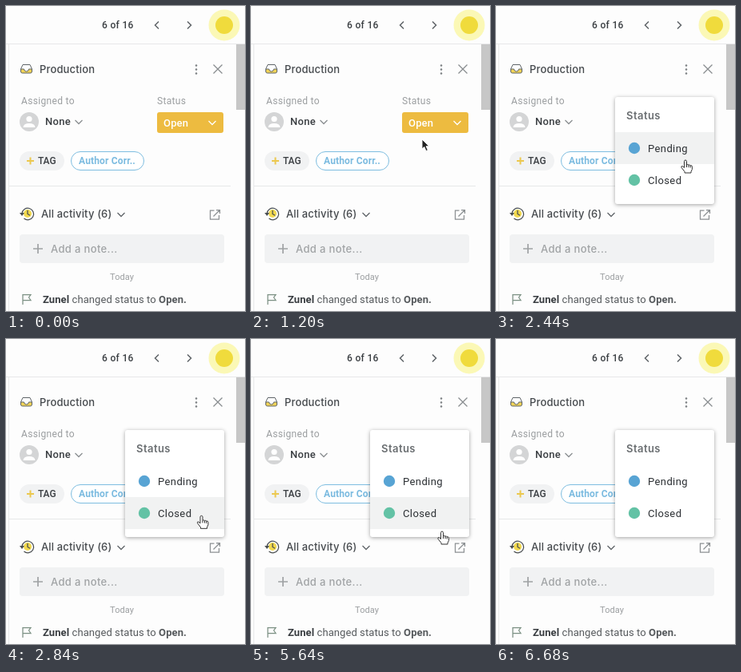
Write an HTML page that moves like this. It is 299x382 px and loops after 6720 ms.

```html
<!DOCTYPE html>
<html lang="en">
<head>
<meta charset="utf-8">
<title>Status menu</title>
<style>
html, body { margin: 0; width: 100%; height: 100%; overflow: hidden; background: #fdfdfd; }
svg { display: block; width: 100vw; height: 100vh; }
text { font: 500 13px Roboto, sans-serif; fill: #3a3e42; }
.wide { font-family: Inter, sans-serif; letter-spacing: .15px; fill: #45494d; }
.label { font-weight: 400; font-size: 12px; letter-spacing: .33px; fill: #9b9ea0; }
.line { fill: none; stroke: #5f6468; stroke-width: 1.25; }
.rule { stroke: #e7e8e9; }
#menu .card { filter: drop-shadow(0 1.5px 2.5px rgba(0, 0, 0, .36)); }
#menu .item { font-weight: 400; letter-spacing: .4px; fill: #2c3034; }
</style>
</head>
<body>
<svg viewBox="0 0 299 382">
  <defs><clipPath id="pane"><rect width="286" height="382"/></clipPath></defs>
  <rect width="299" height="382" fill="#fdfdfd"/>

  <!-- top bar -->
  <path class="rule" d="M0 47.5H299M3.5 47V382M4 225.5H281"/>
  <text x="120" y="28" style="font-size:12px;letter-spacing:.3px">6 of 16</text>
  <path class="line" style="stroke-width:1.5" d="M191 19.5L186.5 24L191 28.5M227 19.5L231.5 24L227 28.5"/>
  <circle cx="273" cy="24" r="19.5" fill="#fbf8b6"/>
  <circle cx="273" cy="24" r="11" fill="#f0db3c"/>
  <rect x="288" y="48" width="11" height="82" fill="#c7c7c7"/>

  <!-- heading -->
  <path d="M18.5 79H22.5Q23 82 25.5 82T28.5 79H32.5V82Q32.5 84 30.5 84H20.5Q18.5 84 18.5 82Z" fill="#f0d358"/>
  <path class="line" style="stroke-width:1" d="M18.5 79L21 73.5H30L32.5 79V82Q32.5 84 30.5 84H20.5Q18.5 84 18.5 82ZH22.5Q23 82 25.5 82T28.5 79H32.5"/>
  <text class="wide" x="42" y="84">Production</text>
  <g fill="#7b7f82"><circle cx="238" cy="74.5" r="1.25"/><circle cx="238" cy="79.5" r="1.25"/><circle cx="238" cy="84.5" r="1.25"/></g>
  <path class="line" style="stroke:#888c8f" d="M259.5 73.5L270.5 84.5M270.5 73.5L259.5 84.5"/>

  <!-- assignee and status -->
  <text class="label" x="19" y="123">Assigned to</text>
  <text class="label" x="189" y="123">Status</text>
  <circle cx="29" cy="145" r="12" fill="#d4d5d6"/>
  <circle cx="29" cy="141.5" r="3.6" fill="#fff"/>
  <path d="M21.5 152Q22 147 29 147T36.5 152Z" fill="#fff"/>
  <text x="49" y="149" style="letter-spacing:.3px">None</text>
  <path class="line" style="stroke:#8a8e91" d="M86.5 143L91 147.5L95.5 143"/>
  <rect x="189" y="133" width="83" height="26" rx="3" fill="#edbb40"/>
  <text x="197" y="151" style="fill:#fff;letter-spacing:.15px">Open</text>
  <path class="line" style="stroke:#fff" d="M253.5 144L258 148.5L262.5 144"/>

  <!-- tags -->
  <rect x="17" y="182" width="56" height="24" rx="12" fill="#f1f2f3"/>
  <path d="M26 194H35M30.5 189.5V198.5" stroke="#ecc84f" stroke-width="2"/>
  <text x="40" y="198" style="font-size:12px">TAG</text>
  <rect x="81.5" y="182.5" width="91" height="23" rx="11.5" fill="#fff" stroke="#7dbde0"/>
  <text x="91" y="198" style="font-size:12px;font-weight:700;letter-spacing:.15px;fill:#7bbbe0">Author Corr..</text>

  <!-- activity -->
  <circle cx="27" cy="260" r="5" fill="#f2d94e"/>
  <path class="line" style="stroke:#484d51" d="M20 260A7.300 7.300 0 1 1 22.5 266M27 256V260.5L30 262.3"/>
  <path d="M17 259H23L20 263Z" fill="#484d51"/>
  <text class="wide" x="44" y="265">All activity (6)</text>
  <path class="line" d="M139.5 259L144 263.5L148.5 259"/>
  <path class="line" style="stroke:#8c9093" d="M260.5 256H255.5V267H266.5V262M263 255.5H267.5V260M267 256L259.5 263.5"/>
  <rect x="17" y="286" width="256" height="36" rx="4" fill="#f1f2f3"/>
  <path d="M34 304H46M40 298V310" stroke="#9fa2a4" stroke-width="1.7"/>
  <text class="wide" x="56" y="309" style="letter-spacing:.35px;fill:#a0a3a5">Add a note...</text>
  <text class="label" x="130" y="343" style="font-size:11px;letter-spacing:.1px">Today</text>
  <path class="line" style="stroke:#7b9083" d="M21 374V361.5H31L28.5 365L31 368.5H21"/>
  <text x="46" y="372" style="font-weight:400;fill:#55595c;letter-spacing:.08px"><tspan font-weight="700" fill="#3a3e42">Zunel</tspan> changed status to <tspan font-weight="700">Open.</tspan></text>

  <g clip-path="url(#pane)"><g id="menu">
    <rect class="card" x="149" y="114" width="124" height="134" rx="3" fill="#fff"/>
    <rect id="hover" x="149" width="124" height="40" fill="#f1f2f2"/>
    <text class="wide" x="163" y="142" style="font-weight:600;letter-spacing:.45px;fill:#6a6e71">Status</text>
    <circle cx="173" cy="178" r="7.2" fill="#58a4d4"/>
    <text class="item" x="190" y="183">Pending</text>
    <circle cx="173" cy="218" r="7.2" fill="#63c2a5"/>
    <text class="item" x="190" y="223">Closed</text>
  </g></g>

  <!-- pointers, tip at 0,0 -->
  <path id="arrow" d="M0 0V12L2.8 9.5L5 14.5L7.3 13.5L5 8.7H8.8Z" fill="#222" stroke="#fff" stroke-width=".9"/>
  <g id="hand" fill="#fff" stroke="#333" stroke-linejoin="round">
    <path d="M-1.5 1.5Q-1.4 0 0 0T1.5 1.5V6Q2.8 4.8 4 6.2Q5.4 5.2 6.2 6.8Q8.2 6.2 8.4 8.2V11.5L7 14.5V16H-1V14.5L-5 9.3Q-5.6 7.3-3.7 7.6L-1.5 9.5Z"/>
    <path d="M1.5 6V9M4 6.2V9.2M6.2 6.8V9.5" fill="none"/>
  </g>
</svg>
<script>
const LOOP = 6720, STEP = 40;
const $ = id => document.getElementById(id);

// pointer tip: time, x, y
const path = [
  [600, 240, 395], [1200, 214, 167], [1320, 214, 167], [1520, 227, 149],
  [2240, 227, 149], [2440, 237, 193], [2920, 246, 227], [3600, 246, 227],
  [3640, 246, 226], [3800, 246, 226], [3840, 245, 225], [4720, 245, 225],
  [4880, 243, 232], [5600, 243, 232], [5640, 239, 241], [5680, 239, 241],
  [6240, 230, 395]
];

function pointer(t) {
  const i = path.findIndex(p => p[0] >= t);
  if (i < 1) return [0, 500];
  const [t0, x0, y0] = path[i - 1], [t1, x1, y1] = path[i];
  const k = (t - t0) / (t1 - t0);
  return [x0 + (x1 - x0) * k, y0 + (y1 - y0) * k];
}

const show = (el, on) => el.setAttribute("visibility", on ? "inherit" : "hidden");

function draw(now) {
  const t = Math.floor(now % LOOP / STEP) * STEP;
  const [x, y] = pointer(t);
  const overLink = t >= 1440 && y < 249;
  for (const [id, on] of [["arrow", !overLink], ["hand", overLink]]) {
    $(id).setAttribute("transform", `translate(${x} ${y})`);
    show($(id), on);
  }

  // the menu grows towards its place beside the button
  const open = Math.min(1, Math.max(0, (t - 1680) / 240));
  const scale = 1 - .52 * (1 - open) ** 2;
  show($("menu"), open > 0);
  $("menu").setAttribute("opacity", Math.min(1, open * 3));
  $("menu").setAttribute("transform", `translate(343 193) scale(${scale}) translate(-343 -193)`);
  show($("hover"), open === 1 && y >= 158 && y < 244);
  $("hover").setAttribute("y", y < 198 ? 158 : 198);
  requestAnimationFrame(() => draw(performance.now() - start));
}

const start = performance.now();
draw(0);
</script>
</body>
</html>
```
